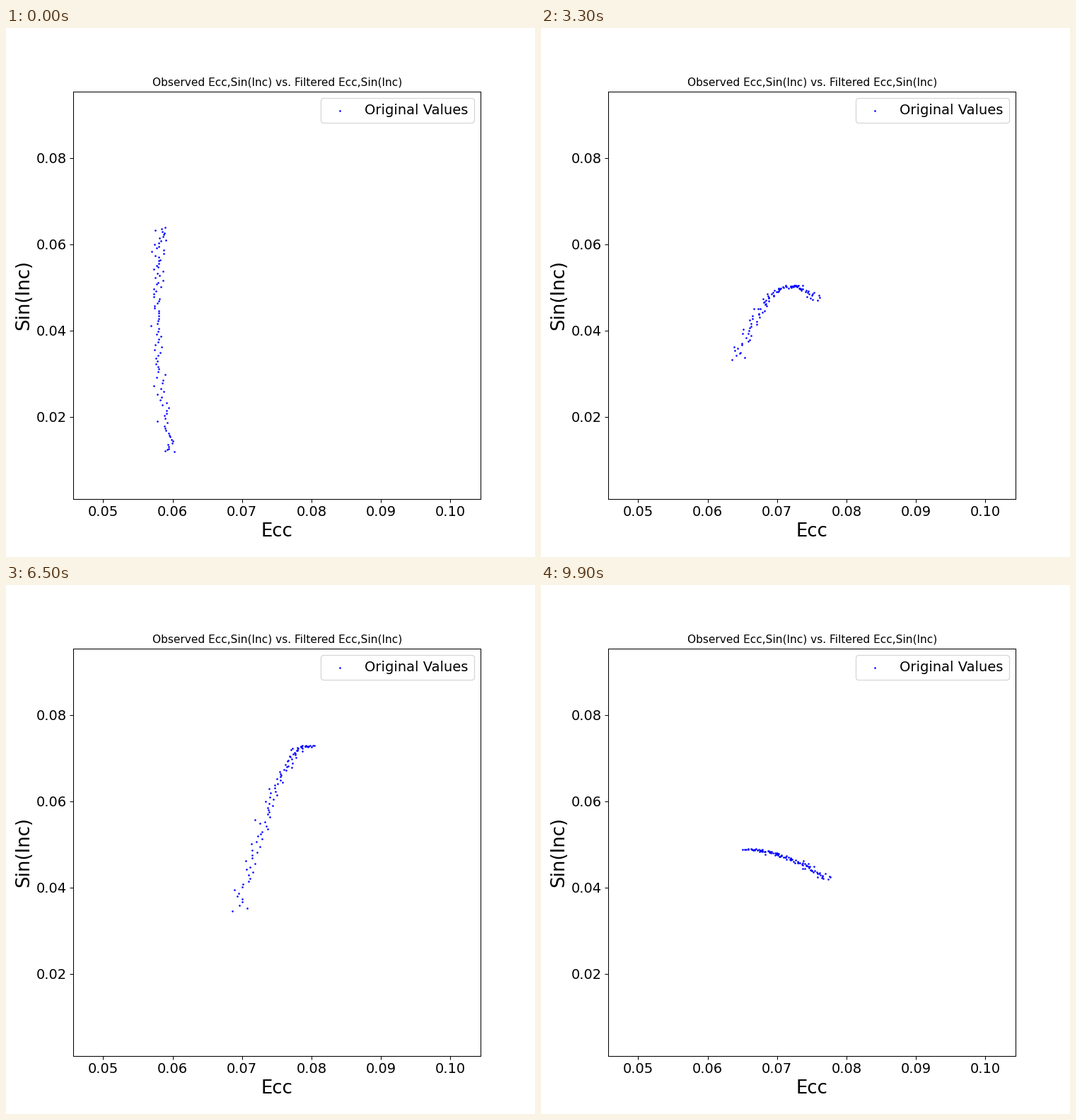
Animation, 748 px wide and 748 px high, one loop 10 s. Source, as a matplotlib script:

```python
import numpy as np
import matplotlib.pyplot as plt
from matplotlib.animation import FuncAnimation

FRAMES, COUNT = 100, 100
RATE = 31.5  # degrees of precession per step

# A few key points: step, ecc phase, inc phase, inc spread (degrees).
KEYS = [(0, 186, 113, 62), (14, 186, 71, 38), (33, 132, 69, 71),
        (56, 183, 211, 62), (73, 175, 136, 75), (84, 175, 152, 26),
        (99, 205, 88, 30)]
steps, *drifts = np.transpose(KEYS)

rng = np.random.default_rng(4)
rank = np.linspace(-1, 1, COUNT)
ecc_amp = 0.0125 + rng.normal(0, 0.0004, COUNT)
inc_amp = 0.0295 + rng.normal(0, 0.0001, COUNT)
ecc_jitter = rng.normal(0, 2.4, COUNT)


def orbits(step):
    """Eccentricity and sin(inclination) of every body."""
    ecc_drift, inc_drift, spread = (np.interp(step, steps, d) for d in drifts)
    ecc_angle = np.radians(RATE * step + ecc_drift + 27 * rank + ecc_jitter)
    inc_angle = np.radians(RATE * step + inc_drift + spread * rank)
    inc_forced = 0.0315 + 0.0125 * np.cos(np.radians(40 + 5.2 * step))
    ecc = 0.0702 + ecc_amp * np.cos(ecc_angle)
    inc = np.abs(inc_forced + inc_amp * np.exp(1j * inc_angle))
    return np.column_stack([ecc, inc])


plt.rcParams["font.family"] = "DejaVu Sans"
fig, ax = plt.subplots(figsize=(8, 8), dpi=93.5)
ax.set_box_aspect(1)
ax.set_xlim(0.04572, 0.10438)
ax.set_ylim(0.00096, 0.09546)
ax.set_xticks(np.arange(0.05, 0.101, 0.01))
ax.set_yticks(np.arange(0.02, 0.081, 0.02))
ax.xaxis.set_major_formatter("{x:.2f}")
ax.yaxis.set_major_formatter("{x:.2f}")
ax.tick_params(labelsize=15)
ax.set_title("Observed Ecc,Sin(Inc) vs. Filtered Ecc,Sin(Inc)", fontsize=11.88)
ax.set_xlabel("Ecc", fontsize=20)
ax.set_ylabel("Sin(Inc)", fontsize=20)

dots = ax.scatter(*orbits(0).T, s=1, c="blue", label="Original Values")
ax.legend(loc="upper right", fontsize=15)


def update(step):
    dots.set_offsets(orbits(step))
    return (dots,)


anim = FuncAnimation(fig, update, frames=FRAMES, interval=100,
                     repeat=True, repeat_delay=0)
plt.show()
```
